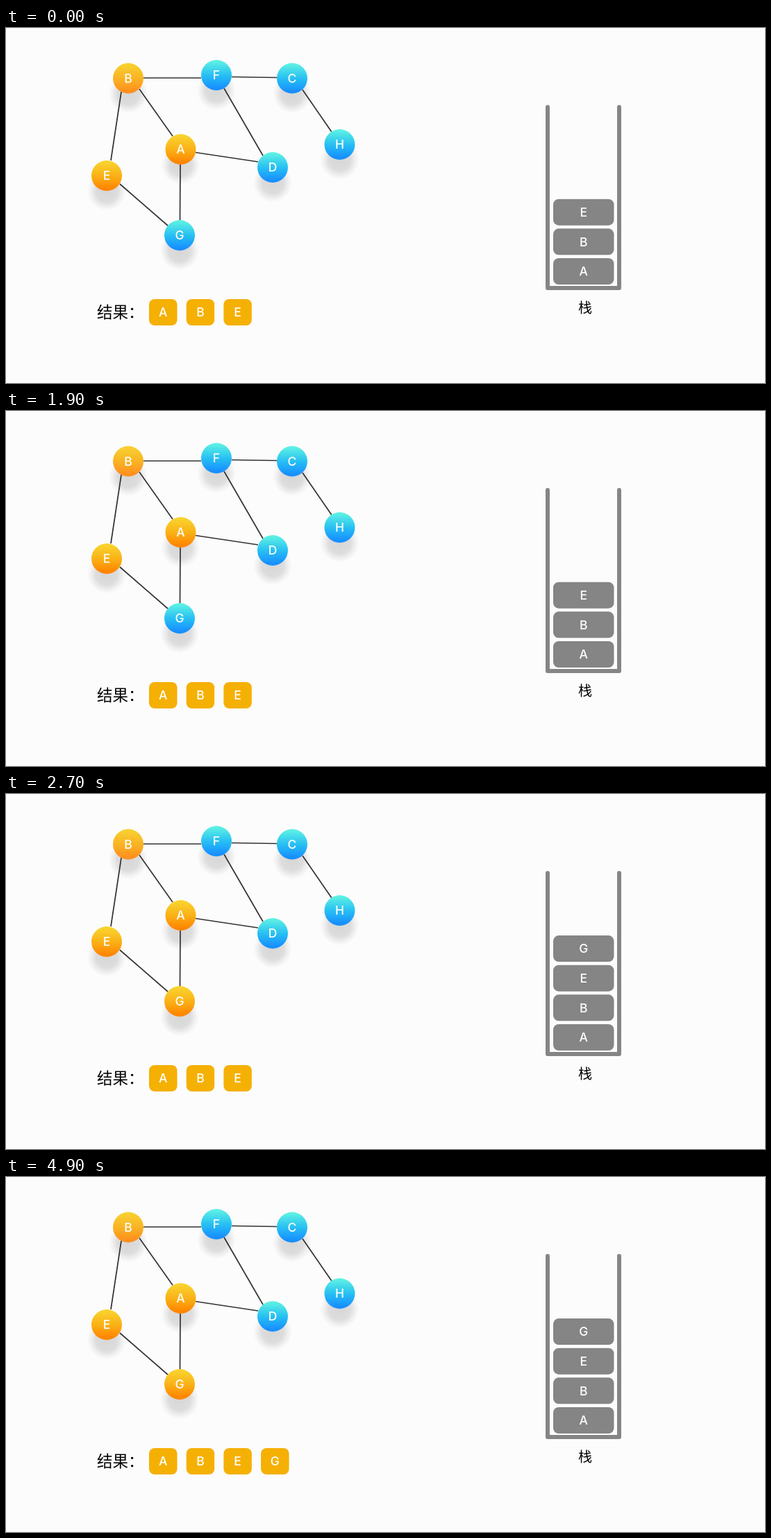
Recreate the animation shown at these times as an HTML page. Size 1093 by 512 pixels, loop 5 s.

```html
<!DOCTYPE html>
<html lang="zh-CN">
<head>
<meta charset="utf-8">
<title>Depth-first search</title>
<style>
  html, body { margin: 0; width: 100%; height: 100%; overflow: hidden; background: #fcfcfc; }
  svg { display: block; width: 100vw; height: 100vh; }
  text { font-family: "Inter", "Liberation Sans", sans-serif; font-weight: 500; font-size: 17.5px; fill: #fff; text-anchor: middle; }
  .label { font-family: "Noto Sans CJK SC", "Noto Sans CJK", sans-serif; fill: #000; }
</style>
</head>
<body>
<svg viewBox="0 0 1093 512" xmlns="http://www.w3.org/2000/svg">
  <defs>
    <radialGradient id="shade">
      <stop offset="0" stop-color="#000" stop-opacity=".15"/>
      <stop offset=".55" stop-color="#000" stop-opacity=".125"/>
      <stop offset=".8" stop-color="#000" stop-opacity=".05"/>
      <stop offset="1" stop-color="#000" stop-opacity="0"/>
    </radialGradient>
  </defs>
  <g id="shadows"></g>
  <g id="edges" stroke="#333" stroke-width="1.7"></g>
  <g id="nodes"></g>
  <text class="label" x="131" y="418" style="font-size:22.5px;text-anchor:start">结果：</text>
  <g id="results"></g>
  <path d="M780 114V375H883V114" fill="none" stroke="#858585" stroke-width="6" stroke-linecap="round" stroke-linejoin="round"/>
  <g id="stack"></g>
  <text class="label" x="834" y="410.5" style="font-size:20px;font-weight:400">栈</text>
</svg>
<script>
const LOOP = 5000, TICK = 100;
const BLUE = [[92, 240, 228], [38, 190, 243], [24, 144, 255]];
const TAN = [[199, 184, 146], [178, 169, 146], [160, 158, 150]];
const GOLD = [[249, 211, 46], [250, 176, 22], [255, 134, 0]];
const AMBER = [[248, 208, 48], [249, 178, 36], [255, 144, 30]];

const nodes = {
  A: [251.5, 175, GOLD], B: [176, 72.5, AMBER], C: [412, 72.5, BLUE], D: [384, 201, BLUE],
  E: [145, 213, GOLD], F: [303, 68, BLUE], G: [250, 299, BLUE], H: [480.5, 168, BLUE]
};
const edges = [
  [198, 72, 281, 72], [325, 70.5, 390, 71.5], [427, 89, 469, 150],
  [166, 92, 151, 191], [192, 88, 240, 156], [273, 179.5, 363, 193],
  [314, 87, 370, 184], [251, 197, 250.5, 277], [164, 225, 233, 285]
];

const $ = id => document.getElementById(id);
const clamp = v => Math.min(1, Math.max(0, v));
const span = (t, from, to) => clamp((t - from) / (to - from));
const ease = p => p * p * (3 - 2 * p);
const rgb = c => `rgb(${c.map(Math.round)})`;
const mix = (a, b, p) => a.map((v, i) => v + (b[i] - v) * p);

function add(parent, tag, attrs, text) {
  const el = document.createElementNS("http://www.w3.org/2000/svg", tag);
  for (const k in attrs) el.setAttribute(k, attrs[k]);
  if (text) el.textContent = text;
  return parent.appendChild(el);
}

function letter(parent, x, y, ch) {
  add(parent, "text", { x, y: y + 6.4 }, ch);
}

function box(parent, x, y, w, fill, ch) {
  const g = add(parent, "g", {});
  add(g, "rect", { x, y, width: w, height: 38, rx: 8, fill });
  letter(g, x + w / 2, y + 19, ch);
  return g;
}

function addNode(ch) {
  const [x, y, colors] = nodes[ch];
  add($("shadows"), "circle", { cx: x, cy: y + 22.5, r: 28, fill: "url(#shade)" });
  const id = "fill" + ch;
  const grad = add($("nodes"), "linearGradient", { id, x1: 0, y1: 0, x2: 0, y2: 1 });
  const stops = colors.map((c, i) => add(grad, "stop", { offset: [0.05, 0.52, 0.92][i], "stop-color": rgb(c) }));
  add($("nodes"), "circle", { cx: x, cy: y, r: 22, fill: `url(#${id})` });
  letter($("nodes"), x, y, ch);
  return stops;
}

const stops = {};
for (const ch in nodes) stops[ch] = addNode(ch);
for (const [x1, y1, x2, y2] of edges) add($("edges"), "line", { x1, y1, x2, y2 });

const tiles = [..."ABEG"].map((ch, i) => box($("results"), 206 + i * 53.7, 391, 40.5, "#f5b004", ch));
const blocks = [..."ABEG"].map((ch, i) => box($("stack"), 788, 332 - i * 42.65, 87.5, "#858585", ch));
const newTile = tiles[3], newBlock = blocks[3];

function draw(t) {
  const p = span(t, 2000, 2400) * 2;
  stops.G.forEach((s, i) => {
    const c = p < 1 ? mix(BLUE[i], TAN[i], p) : mix(TAN[i], GOLD[i], p - 1);
    s.setAttribute("stop-color", rgb(c));
  });
  const lift = -83.3 * (1 - ease(span(t, 2250, 2650)));
  newBlock.setAttribute("transform", `translate(0 ${lift})`);
  newBlock.setAttribute("opacity", span(t, 1920, 2180));
  newTile.setAttribute("opacity", ease(span(t, 3100, 3500)));
}

// The motion advances ten times a second.
function loop() {
  const t = performance.now() % LOOP;
  draw(Math.floor(t / TICK) * TICK);
  requestAnimationFrame(loop);
}
loop();
</script>
</body>
</html>
```
